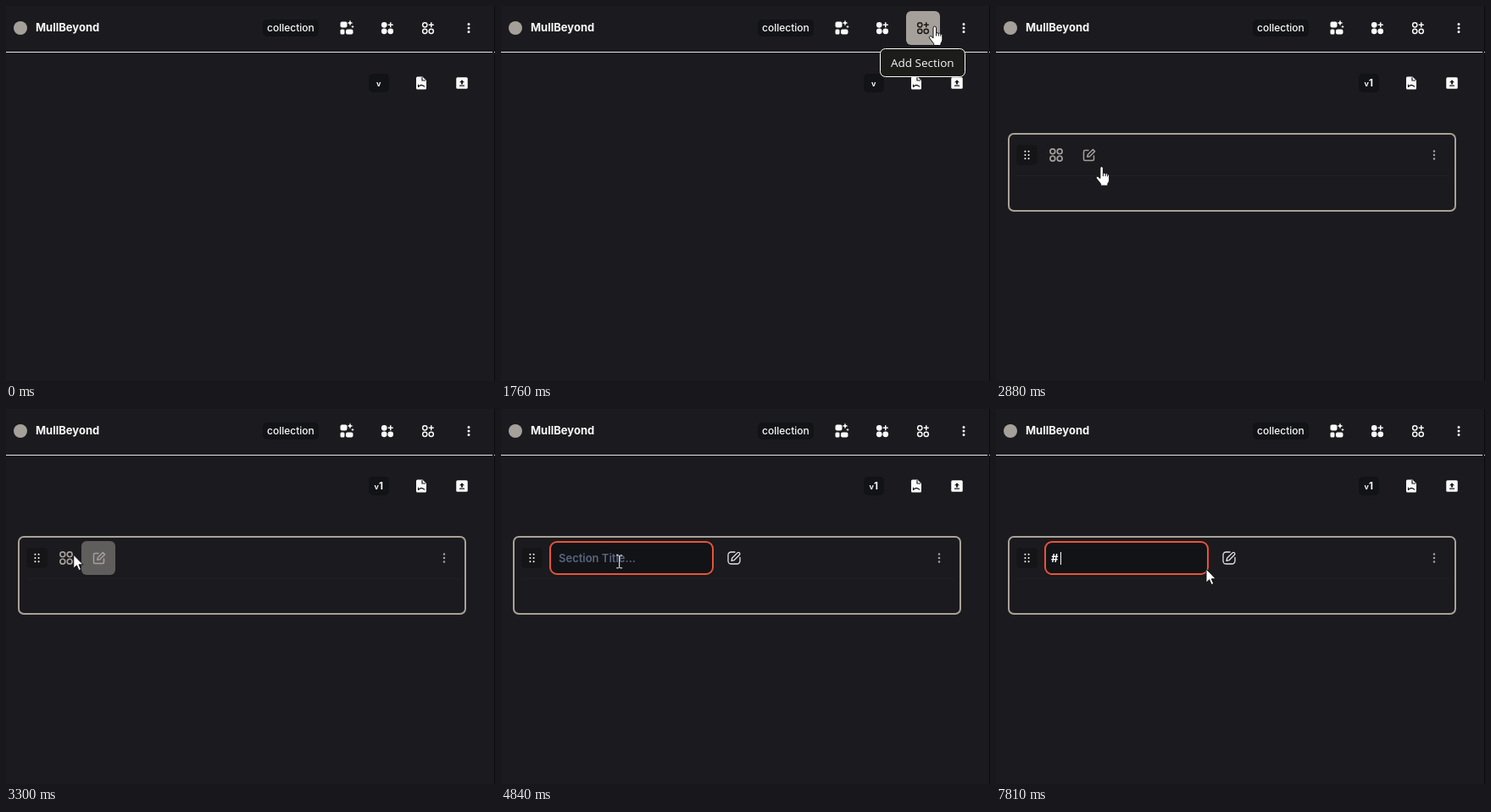
Animation of 577x443 px, one loop 8 s. Source, as an HTML page:

```html
<!DOCTYPE html>
<html lang="en">
<head>
<meta charset="utf-8">
<title>Add a section</title>
<style>
  html, body { margin: 0; width: 100%; height: 100%; overflow: hidden; background: #1b1a1e; }
  svg { display: block; font-family: Inter, sans-serif; fill: #fafaf9; color: #fafaf9; }
  .dark { fill: #121316; }
  .muted { fill: #a6a09b; }
  .line, .dots { fill: none; stroke: currentColor; stroke-width: 1.5; stroke-linecap: round; stroke-linejoin: round; }
  .dots { stroke-width: 3; stroke-dasharray: 0 4.5; }
  .grip { stroke-width: 2; stroke-dasharray: 0 4.2; }
  .outlined { fill: #fff; stroke: #111; stroke-linejoin: round; }
  .bold { font-weight: 700; }
</style>
</head>
<body>
<svg width="577" height="443" viewBox="0 0 577 443">
  <defs>
    <g id="three">
      <circle cx="-3.75" cy="-3.75" r="2.625"/>
      <circle cx="-3.75" cy="3.75" r="2.625"/>
      <circle cx="3.75" cy="3.75" r="2.625"/>
    </g>
    <path id="plus" d="M3.75 -6.75v6M.75 -3.75h6" stroke-linecap="butt"/>
  </defs>

  <rect x="576" width="1" height="443" fill="#0b0b0d"/>
  <path d="M0 54h574v1H0zM576 54h1v1h-1z" fill="#e7e5e4"/>

  <!-- top bar -->
  <circle cx="17" cy="26" r="8" class="muted"/>
  <text x="35" y="30" font-size="13" class="bold">MullBeyond</text>
  <rect x="303" y="16" width="66" height="20" rx="5" class="dark"/>
  <text x="308" y="30" font-size="12" font-weight="500">collection</text>

  <rect x="394.5" y="18.5" width="8" height="7" rx="2"/>
  <rect x="394.5" y="27.5" width="5" height="6" rx="1.5"/>
  <rect x="401" y="27.5" width="8.5" height="6" rx="2"/>
  <path d="M406 16.5l1 2.5 2.5 1-2.5 1-1 2.5-1-2.5-2.5-1 2.5-1zM409 22.5l.6 1.4 1.4.6-1.4.6-.6 1.4-.6-1.4-1.4-.6 1.4-.6z"/>

  <g class="line" transform="translate(450 26)">
    <use href="#three" fill="#fafaf9"/><use href="#plus"/>
  </g>
  <rect id="addHover" x="478" y="6" width="40" height="40" rx="6" class="muted"/>
  <g id="addIcon" class="line" transform="translate(498 26)">
    <use href="#three"/><use href="#plus"/>
  </g>
  <path class="dots" d="M546 21.5v9.1"/>

  <!-- tool row -->
  <rect x="428" y="80" width="24" height="22" rx="5" class="dark"/>
  <text id="version" y="95" font-size="9" class="bold">v</text>
  <text id="number" x="440" y="95" font-size="11.5" class="bold">1</text>
  <path d="M485.5 83.5h6l4.5 4.5v9a1.5 1.5 0 0 1-1.5 1.5h-9a1.5 1.5 0 0 1-1.5-1.5v-12a1.5 1.5 0 0 1 1.5-1.5z"/>
  <path class="line" color="#1b1a1e" style="stroke-width:1.2" d="M491 84.5v3.5h3.5M486.5 95.5v-2.5M487 95q3-3 6.5 0"/>
  <rect x="531.25" y="84.25" width="13.5" height="13.5" rx="1.5"/>
  <path d="M538 87.2l3 3h-1.9v2.3h-2.2v-2.3H535zM535 93.6h6v1.2h-6z" fill="#1b1a1e"/>

  <!-- section -->
  <g id="section">
    <rect x="15" y="151" width="527" height="91" rx="6" fill="none" stroke="#a8a297" stroke-width="2"/>
    <rect x="24" y="200" width="510" height="1" fill="#212024"/>
    <rect x="24" y="164" width="25" height="24" rx="5" fill="#151518"/>
    <path class="dots grip" d="M34.4 171.8v8.5M38.6 171.8v8.5"/>
    <path class="dots" color="#a6a09b" style="stroke-width:2.6" d="M517 171.5v9.1"/>

    <g id="view">
      <g class="line" color="#a6a09b" transform="translate(71 176) scale(1.11)">
        <use href="#three"/><circle cx="3.75" cy="-3.75" r="2.625"/>
      </g>
      <rect id="editHover" x="89" y="156" width="40" height="40" rx="6" class="muted"/>
      <path id="editIcon" class="line" d="M109 170.5h-4a1.5 1.5 0 0 0-1.5 1.5v9a1.5 1.5 0 0 0 1.5 1.5h9a1.5 1.5 0 0 0 1.5-1.5v-4M107.800 178.200l.6-2.700 6-6 2.200 2.200-6 6z"/>
    </g>

    <g id="edit">
      <rect x="58" y="157" width="192" height="38" rx="8" class="dark" stroke="#e8533a" stroke-width="2"/>
      <text id="hint" x="68" y="181" font-size="13" font-weight="600" fill="#5b6480">Section Title...</text>
      <text id="typed" x="65" y="181" font-size="13" class="bold">#</text>
      <rect id="caret" y="169" width="1" height="15"/>
      <path class="line" color="#e7e5e4" style="stroke-width:1.3" d="M276 169h-4.5a3.5 3.5 0 0 0-3.5 3.5v7a3.5 3.5 0 0 0 3.5 3.5h7a3.5 3.5 0 0 0 3.5-3.5v-4M272 179.3l.6-3 6.4-6.4q1.3-1.2 2.4 0 1.1 1.1 0 2.4l-6.4 6.400z"/>
    </g>
  </g>

  <g id="tooltip">
    <rect x="447.5" y="50.5" width="100" height="33" rx="6" fill="#1c1c1a" stroke="#fafaf9"/>
    <text x="460" y="72" font-size="13.5" font-family="'Open Sans', sans-serif">Add Section</text>
  </g>

  <g id="cursor">
    <path id="arrow" class="outlined" d="M0 0v16.2l3.7-3.5 2.5 5.8 2.6-1.1-2.5-5.7h5z"/>
    <g id="hand" transform="translate(1 .5)">
      <path class="outlined" d="M-2 1.5q0-2 1.7-2t1.8 2v6q1.5-1 2.7.4 1.6-.8 2.5.7 2.1-.4 2.1 1.7v4.700q0 2.5-1.8 4.500v2.500h-8.300v-2l-5-6.500q-1-1.900.5-2.500 1.300-.4 3.800 2.500z"/>
      <path d="M1.500 7.500v3.500M4.200 8v3M6.700 8.700v2.500" fill="none" stroke="#111"/>
    </g>
    <path id="beam" d="M-3.5-7.5h2.5l1 1 1-1h2.5M0-6.5v13M-3.5 7.5h2.5l1-1 1 1h2.5" fill="none" stroke="#fff"/>
  </g>
</svg>
<script>
const DURATION = 8000, STEP = 70, FADE = 170, BLINK = 515;
const ADDED = 1900, FOCUSED = 4280, TYPED = 7030, SPACED = 7810;
const ADD_HOVERS = [[630, 2180]];
const EDIT_HOVERS = [[2880, 3215], [3790, FOCUSED]];

// pointer moves: start, end, target, optional bend point
const HOME = [568, 409];
const MOVES = [
  [140, 280, [564, 89]],
  [280, 910, [511, 24]],
  [2110, 2950, [121, 189], [330, 240]],
  [3090, 3370, [77, 171]],
  [3650, 4000, [112, 179]],
  [4350, 4560, [127, 182]],
  [4770, 5330, [181, 175]],
  [5470, 5890, [248, 189]]
];

const $ = id => document.getElementById(id);
const show = (id, on) => $(id).style.display = on ? '' : 'none';
const within = (t, ranges) => ranges.some(([from, to]) => t >= from && t < to);
const clamp = x => Math.min(1, Math.max(0, x));
const mix = (a, b, p) => a + (b - a) * p;
const easeOut = p => 1 - (1 - p) ** 2;
const smooth = p => p * p * (3 - 2 * p);

function pointerAt(t) {
  let from = HOME;
  for (const [start, end, to, bend] of MOVES) {
    if (t < start) break;
    const p = easeOut(clamp((t - start) / (end - start)));
    from = from.map((a, i) => {
      const c = bend ? bend[i] : (a + to[i]) / 2;
      return mix(mix(a, c, p), mix(c, to[i], p), p);
    });
  }
  return from;
}

function drawButton(name, t, hovers, color) {
  const ramp = time => smooth(clamp((t - time) / FADE));
  const strength = Math.max(...hovers.map(([on, off]) => ramp(on) - ramp(off)));
  $(name + 'Hover').style.opacity = strength;
  $(name + 'Icon').style.color = strength > .6 ? '#1c1917' : color;
}

function drawCaret(time) {
  const lastInput = [FOCUSED + 40, TYPED, SPACED].findLast(input => time >= input);
  show('caret', Math.floor((time - lastInput) / BLINK) % 2 === 0);
  $('caret').setAttribute('x', time < TYPED ? 65 : time < SPACED ? 73 : 76);
}

function drawPointer(t) {
  const hand = within(t, [...ADD_HOVERS, ...EDIT_HOVERS]);
  const beam = within(t, [[FOCUSED, 5890]]);
  show('hand', hand);
  show('beam', beam);
  show('arrow', !hand && !beam);
  $('cursor').setAttribute('transform', `translate(${pointerAt(t)})`);
}

function draw(time) {
  // the screen refreshes in 70 ms steps
  const t = 10 + Math.floor((time - 10) / STEP) * STEP;
  const added = t >= ADDED, editing = t >= FOCUSED, typed = time >= TYPED;

  drawButton('add', t, ADD_HOVERS, '#fafaf9');
  drawButton('edit', t, EDIT_HOVERS, '#a6a09b');
  show('tooltip', within(t, [[1760, ADDED]]));
  show('section', added);
  show('number', added);
  $('version').setAttribute('x', added ? 434.5 : 437);
  show('view', !editing);
  show('edit', editing);
  show('hint', !typed);
  show('typed', typed);
  drawCaret(time);
  drawPointer(t);
  show('cursor', within(time, [[70, 140], [280, DURATION]]));
}

const start = performance.now();
function tick() {
  draw((performance.now() - start) % DURATION);
  requestAnimationFrame(tick);
}
tick();
</script>
</body>
</html>
```
